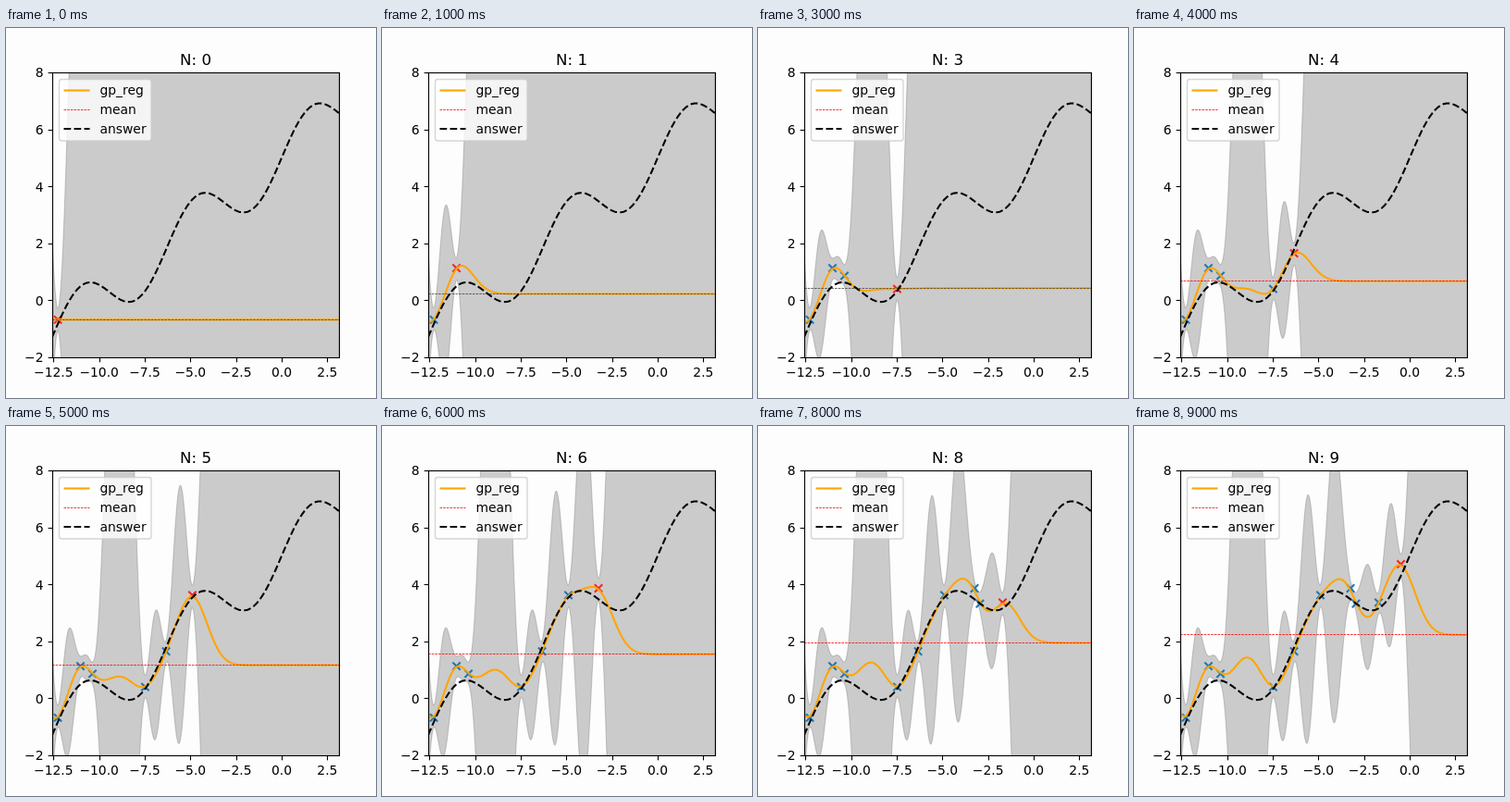
Animation of 400 by 400 pixels, one loop 10000 ms. Source, as an HTML page with a canvas:

```html
<!DOCTYPE html>
<html lang="en">
<head>
<meta charset="utf-8">
<title>Gaussian process regression</title>
<style>
  html, body { margin: 0; width: 100%; height: 100%; overflow: hidden; background: #fdfdfd; }
  canvas { display: block; }
</style>
</head>
<body>
<canvas id="stage" width="400" height="400"></canvas>
<script>
const ctx = document.getElementById('stage').getContext('2d');
const BOX = { left: 50, top: 48, width: 310, height: 308 };
const X_MIN = -4 * Math.PI, X_MAX = Math.PI, Y_MIN = -2, Y_MAX = 8;
const STEP_MS = 1000;
const SAMPLES = 400;

const POINTS = [
  [-12.26, -0.68], [-11.02, 1.13], [-10.36, 0.86], [-7.475, 0.4], [-6.33, 1.65],
  [-4.89, 3.62], [-3.24, 3.86], [-2.94, 3.32], [-1.7, 3.36], [-0.48, 4.71]
];
const KERNEL_WIDTH = 1.36, NOISE = 0.02, BAND = 20;

const px = x => BOX.left + (x - X_MIN) / (X_MAX - X_MIN) * BOX.width;
const py = y => BOX.top + (Y_MAX - y) / (Y_MAX - Y_MIN) * BOX.height;
const answer = x => Math.sin(x) + x / 2 + 5;
const kernel = (a, b) => Math.exp(-((a - b) ** 2) / KERNEL_WIDTH);
const dot = (a, b) => a.reduce((sum, v, i) => sum + v * b[i], 0);
const grid = Array.from({ length: SAMPLES + 1 },
  (_, i) => X_MIN + (X_MAX - X_MIN) * i / SAMPLES);

// Gauss-Jordan inverse of a positive definite matrix
function invert(matrix) {
  const n = matrix.length;
  const rows = matrix.map((row, i) => [...row, ...row.map((_, j) => +(i === j))]);
  for (let i = 0; i < n; i++) {
    const pivot = rows[i][i];
    rows[i] = rows[i].map(v => v / pivot);
    for (let r = 0; r < n; r++) {
      if (r === i) continue;
      const factor = rows[r][i];
      rows[r] = rows[r].map((v, c) => v - factor * rows[i][c]);
    }
  }
  return rows.map(row => row.slice(n));
}

function regress(points) {
  const xs = points.map(p => p[0]);
  const mean = points.reduce((sum, p) => sum + p[1], 0) / points.length;
  const inverse = invert(xs.map((a, i) =>
    xs.map((b, j) => kernel(a, b) + (i === j ? NOISE : 0))));
  const weights = inverse.map(row => dot(row, points.map(p => p[1] - mean)));
  const curve = grid.map(x => {
    const k = xs.map(a => kernel(x, a));
    const variance = 1 - dot(k, inverse.map(row => dot(row, k)));
    return { x, y: mean + dot(k, weights), spread: BAND * variance };
  });
  return { mean, curve };
}

const steps = POINTS.map((_, n) => regress(POINTS.slice(0, n + 1)));

function line(coords, color, width, dash = []) {
  ctx.beginPath();
  coords.forEach(([x, y]) => ctx.lineTo(x, y));
  ctx.strokeStyle = color;
  ctx.lineWidth = width;
  ctx.setLineDash(dash);
  ctx.stroke();
  ctx.setLineDash([]);
}

function text(label, x, y, size, align) {
  ctx.font = `${size}px "DejaVu Sans", sans-serif`;
  ctx.textAlign = align;
  ctx.fillStyle = '#000';
  ctx.fillText(label, x, y);
}

const gpLine = coords => line(coords, '#ffa500', 2.08);
const meanLine = (coords, color) => line(coords, color, 0.8, [2.57, 1.11]);
const answerLine = coords => line(coords, '#000', 2.08, [7.7, 3.33]);

function cross([x, y], color) {
  const cx = px(x), cy = py(y), r = 4.17;
  line([[cx - r, cy - r], [cx + r, cy + r]], color, 2.08);
  line([[cx - r, cy + r], [cx + r, cy - r]], color, 2.08);
}

function band(curve) {
  const edge = sign => curve.map(p => [px(p.x), py(p.y + sign * p.spread)]);
  ctx.beginPath();
  [...edge(1), ...edge(-1).reverse()].forEach(([x, y]) => ctx.lineTo(x, y));
  ctx.closePath();
  ctx.fillStyle = ctx.strokeStyle = 'rgba(128,128,128,0.4)';
  ctx.lineWidth = 1.1;
  ctx.fill();
  ctx.stroke();
}

function axes() {
  ctx.strokeStyle = '#000';
  ctx.lineWidth = 1.1;
  ctx.strokeRect(BOX.left + 0.5, BOX.top + 0.5, BOX.width, BOX.height);
  const minus = label => label.replace('-', '\u2212');
  for (let x = -12.5; x <= 2.5; x += 2.5) {
    const tick = Math.round(px(x)) + 0.5;
    line([[tick, 356.5], [tick, 361.4]], '#000', 1.1);
    text(minus(x.toFixed(1)), px(x), 377, 13.89, 'center');
  }
  for (let y = -2; y <= 8; y += 2) {
    const tick = Math.round(py(y)) + 0.5;
    line([[45.6, tick], [50.5, tick]], '#000', 1.1);
    text(minus(String(y)), 40.5, py(y) + 5.3, 13.89, 'right');
  }
}

function legend() {
  ctx.beginPath();
  ctx.roundRect(57.5, 55.5, 99.5, 66.5, 2.8);
  ctx.fillStyle = 'rgba(255,255,255,0.8)';
  ctx.strokeStyle = 'rgba(204,204,204,0.8)';
  ctx.lineWidth = 1.39;
  ctx.fill();
  ctx.stroke();
  const sample = y => [[62.5, y], [90.5, y]];
  gpLine(sample(67.5));
  meanLine(sample(88.5), '#f00');
  answerLine(sample(109));
  ['gp_reg', 'mean', 'answer'].forEach((label, i) =>
    text(label, 101.5, 72.3 + i * 20.6, 13.89, 'left'));
}

function draw(n) {
  const { mean, curve } = steps[n];
  ctx.fillStyle = '#fdfdfd';
  ctx.fillRect(0, 0, 400, 400);

  ctx.save();
  ctx.beginPath();
  ctx.rect(BOX.left, BOX.top, BOX.width, BOX.height);
  ctx.clip();
  band(curve);
  POINTS.slice(0, n + 1).forEach((p, i) => cross(p, i === n ? '#f22' : '#1f77b4'));
  gpLine(curve.map(p => [px(p.x), py(p.y)]));
  const level = Math.floor(py(mean)) + 0.5;
  meanLine([[px(X_MIN), level], [px(X_MAX), level]], n < 4 ? '#444' : '#f00');
  answerLine(grid.map(x => [px(x), py(answer(x))]));
  ctx.restore();

  axes();
  legend();
  text(`N: ${n}`, 205, 40, 16.67, 'center');
}

const start = performance.now();
let shown = -1;
function tick() {
  const n = Math.floor((performance.now() - start) / STEP_MS) % POINTS.length;
  if (n !== shown) draw(shown = n);
  requestAnimationFrame(tick);
}
tick();
</script>
</body>
</html>
```
